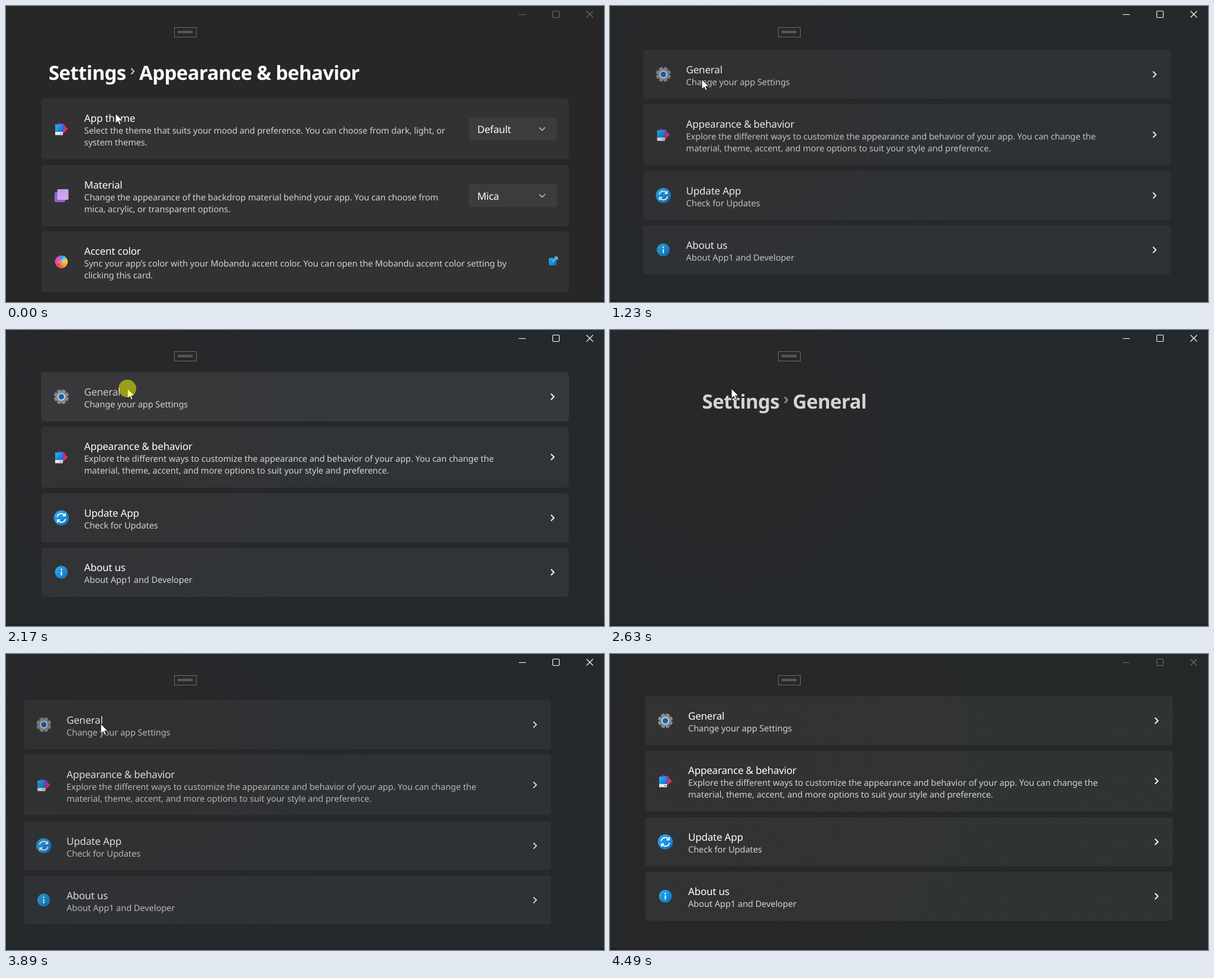
Write an HTML page that moves like this. It is 1010x501 px and loops after 4560 ms.

```html
<!DOCTYPE html>
<html lang="en">
<head>
<meta charset="utf-8">
<title>Settings</title>
<style>
  html, body { margin: 0; width: 100%; height: 100%; overflow: hidden; background: #272727; }
  svg { display: block; width: 1010px; height: 501px; }
  text { font-family: "Noto Sans", "Open Sans", sans-serif; fill: #fff; white-space: pre; text-rendering: geometricPrecision; }
  .crumb { font-size: 33px; font-weight: 600; letter-spacing: -.6px; }
  .head { font-size: 17px; letter-spacing: -.2px; }
  .body { font-size: 14.6px; letter-spacing: -.075px; fill: #d2d2d2; }
  .card { fill: #fff; fill-opacity: .05; stroke: #000; stroke-opacity: .12; }
  .card.hover { fill-opacity: .075; }
  .line { fill: none; stroke: #fff; }
</style>
</head>
<body>
<svg viewBox="0 0 1010 501">
  <defs>
    <radialGradient id="mica" gradientUnits="userSpaceOnUse" cx="200" cy="170" r="430">
      <stop offset=".3" stop-color="#28282a"/><stop offset="1" stop-color="#24292c"/>
    </radialGradient>
    <linearGradient id="blue" x2="1" y2="1">
      <stop stop-color="#2bb4f2"/><stop offset="1" stop-color="#0f6cc4"/>
    </linearGradient>
    <linearGradient id="lilac" x2="1" y2="1">
      <stop stop-color="#c79af0"/><stop offset="1" stop-color="#d9b6ee"/>
    </linearGradient>
  </defs>
  <rect width="1010" height="501" fill="#272727"/>
  <rect id="backdrop" width="1010" height="501" fill="url(#mica)"/>
  <rect y="497" width="1010" height="4" fill="#000" opacity=".12"/>
  <g class="line" style="stroke:#6c6c6c">
    <rect x="284.5" y="36.5" width="37" height="16"/>
    <rect x="290.5" y="42.5" width="24" height="3" fill="#4a4a4a"/>
  </g>
  <g id="caption" class="line" stroke-width="1.1">
    <path d="M866 14.5h12M980.5 8.5l11 11m0-11l-11 11"/>
    <rect x="923.5" y="8.5" width="11" height="11" rx="1.5"/>
  </g>
  <g id="pages"></g>
  <path id="cursor" d="M0 0V17L4 13.2 6.6 19.2 9.2 18 6.7 12.2H12Z" fill="#fff" stroke="#000" stroke-width=".9"/>
  <circle id="press" r="15" fill="#ff0" opacity=".5"/>
</svg>
<script>
const LOOP = 4560;
const $ = id => document.getElementById(id);
const text = (cls, x, y, s) => `<text class="${cls}" x="${x}" y="${y}">${s}</text>`;
const line = (d, width, color = '#fff') =>
  `<path class="line" d="${d}" stroke-width="${width}" style="stroke:${color}"/>`;

// Icons are drawn around their own centre.
const wedge = i => {
  const point = k => `${10.8 * Math.cos(k * Math.PI / 5)} ${10.8 * Math.sin(k * Math.PI / 5)}`;
  const hues = [40, 30, 15, 0, 345, 330, 290, 215, 190, 48];
  return `<path d="M0 0L${point(i)}A10.8 10.8 0 0 1 ${point(i + 1)}Z" fill="hsl(${hues[i]} 85% 62%)"/>`;
};
const tooth = i => `<rect x="-3.2" y="-12.5" width="6.4" height="6" rx="1" transform="rotate(${i * 45 + 22.5})"/>`;
const repeat = (n, f) => Array.from({ length: n }, (_, i) => f(i)).join('');
const icons = {
  gear: `<g fill="#858a8e">${repeat(8, tooth)}<circle r="10"/></g>
    <circle r="6.3" fill="#e4eaf0"/><circle r="4.8" fill="#1462ad"/>`,
  theme: `<path d="M2-8.5L11 0 2 9Z" fill="#e5304f"/><path d="M-6-10L6-8 3 9-6 7Z" fill="#8a37c8"/>
    <rect x="-10.5" y="-7.5" width="13" height="13" fill="url(#blue)"/>
    <rect x="-10.5" y="5" width="13" height="5.5" fill="#e3e6ea"/><circle cx="-.5" cy="7.7" r="1" fill="#667"/>`,
  layers: `<rect x="-11.5" y="-6" width="18" height="17" rx="2" fill="#9560cc"/>
    <rect x="-7" y="-11" width="19" height="18" rx="2" fill="url(#lilac)" opacity=".95"/>`,
  wheel: repeat(10, wedge) + '<circle r="5" fill="#ffd27a" opacity=".35"/>',
  sync: `<circle r="12.7" fill="url(#blue)"/>
    ${line('M-7-1.5A7 7 0 0 1 5.5-4.5M7 1.5A7 7 0 0 1-5.5 4.5M6.6-8v4.5H2M-6.6 8V3.5H-2', 1.8)}`,
  info: `<circle r="10.8" fill="url(#blue)"/><circle cy="-4.6" r="1.3" fill="#fff"/>${line('M0-1.5V5.5', 2)}`,
  link: `<rect x="-7" y="-5.5" width="12.5" height="12.5" rx="1" fill="url(#blue)"/>
    ${line('M-1 1L6.5-6.5M2-7H7V-2', 1.6, '#62d6f5')}`
};
const icon = (name, x, y) => `<g transform="translate(${x} ${y})">${icons[name]}</g>`;

const chevron = y => line(`M920.5 ${y - 5}l5 5-5 5`, 1.9);
const link = y => icon('link', 924, y - 1);
const dropdown = label => y => `<rect class="card" x="781" y="${y - 20}" width="150" height="40" rx="4"/>
  ${text('head', 796, y + 6.5, label)}${line(`M900.5 ${y - 2.5}l5 5 5-5`, 1.4, '#d0d0d0')}`;

function card(top, height, name, head, lines, control) {
  const middle = top + height / 2;
  return `<rect class="card" x="59" y="${top}" width="892" height="${height}" rx="5"/>
    ${icon(name, 93.5, middle)}${text('head', 132, top + 40, head)}
    ${lines.map((s, i) => text('body', 132, top + 60 + 20 * i, s)).join('')}${control(middle)}`;
}
const crumbs = current => text('crumb settings', 72, 125, 'Settings') +
  line('M211.5 105.5l4.5 5-4.5 5', 1.9, '#d0d0d0') + text('crumb', 225, 125, current);

const pageMarkup = {
  appearance: crumbs('Appearance &amp; behavior') +
    card(156, 104, 'theme', 'App theme', ['Select the theme that suits your mood and preference. You can choose from dark, light, or', 'system themes.'], dropdown('Default')) +
    card(269, 104, 'layers', 'Material', ['Change the appearance of the backdrop material behind your app. You can choose from', 'mica, acrylic, or transparent options.'], dropdown('Mica')) +
    card(381, 104, 'wheel', 'Accent color', ['Sync your app’s color with your Mobandu accent color. You can open the Mobandu accent color setting by', 'clicking this card.'], link),
  home:
    card(71, 84, 'gear', 'General', ['Change your app Settings'], chevron) +
    card(163, 104, 'theme', 'Appearance &amp; behavior', ['Explore the different ways to customize the appearance and behavior of your app. You can change the', 'material, theme, accent, and more options to suit your style and preference.'], chevron) +
    card(276, 84, 'sync', 'Update App', ['Check for Updates'], chevron) +
    card(368, 84, 'info', 'About us', ['About App1 and Developer'], chevron),
  general: crumbs('General')
};
$('pages').innerHTML = Object.entries(pageMarkup).map(([id, s]) => `<g id="${id}">${s}</g>`).join('');

const homeCards = [...document.querySelectorAll('#home > .card')];
const homeHead = document.querySelector('#home .head');
const settingsLinks = document.querySelectorAll('.settings');

const visits = [
  { page: 'appearance', enter: -9999, from: 1, leave: 892, to: 1 },
  { page: 'home', enter: 1043, from: -1, leave: 2430, to: -1 },
  { page: 'general', enter: 2628, from: 1, leave: 3650, to: 1 },
  { page: 'home', enter: 3828, from: -1, leave: 9999, to: 1 }
];
const presses = [[550, 760], [2170, 2370], [3350, 3550]];
// start, end, then the point reached
const moves = [[70, 350, 155, 124], [1600, 1970, 205, 99], [2850, 3160, 160, 118], [4060, 4480, 172, 522]];

const ramp = (t, a, b) => Math.min(1, Math.max(0, (t - a) / (b - a)));
const smooth = p => p * p * (3 - 2 * p);

function cursorAt(t) {
  let x = 185, y = 182;
  for (const [a, b, toX, toY] of moves) {
    const p = smooth(ramp(t, a, b));
    x += (toX - x) * p;
    y += (toY - y) * p;
  }
  return [x, y];
}

function placePages(t) {
  for (const id in pageMarkup) $(id).style.display = 'none';
  for (const { page, enter, from, leave, to } of visits) {
    const age = t - enter, out = ramp(t, leave, leave + 150);
    if (age < -15 || out > .85) continue;
    const x = from * 88 * Math.exp(-age / 58) + to * 200 * out ** 3;
    const y = 8 * Math.exp(-((Math.max(0, age) / 180) ** 1.55));
    const g = $(page);
    g.style.display = '';
    g.setAttribute('transform', `translate(${x.toFixed(2)} ${y.toFixed(2)})`);
    g.setAttribute('opacity', (.8 + .2 * ramp(age, 0, 400)) * (1 - out ** 4));
  }
}

function draw(t) {
  placePages(t);
  const [x, y] = cursorAt(t);
  const pressed = presses.some(([a, b]) => t >= a && t < b);
  for (const id of ['cursor', 'press']) $(id).setAttribute('transform', `translate(${x} ${y})`);
  $('press').style.display = pressed ? '' : 'none';

  const onLink = x > 73 && x < 201 && y > 95 && y < 135;
  const released = t >= 760 && t < 2600 || t >= 3550;
  const linkColor = !onLink || released ? '#fff' : pressed ? '#919191' : '#c8c8c8';
  settingsLinks.forEach(el => el.style.fill = linkColor);

  const tracking = t > 1620 && t < 2430 || t > 4060;
  homeCards.forEach(el => {
    const top = el.y.baseVal.value;
    el.classList.toggle('hover', tracking && y > top && y < top + el.height.baseVal.value);
  });
  homeHead.style.fill = pressed ? '#c8c8c8' : '#fff';

  const active = t >= 550 && t < 4420;
  $('caption').style.stroke = active ? '#fff' : '#6e6e6e';
  $('backdrop').setAttribute('opacity', ramp(t, 550, 900) * (1 - ramp(t, 4400, 4580)));
}

function tick() {
  draw(performance.now() % LOOP);
  requestAnimationFrame(tick);
}
tick();
</script>
</body>
</html>
```
